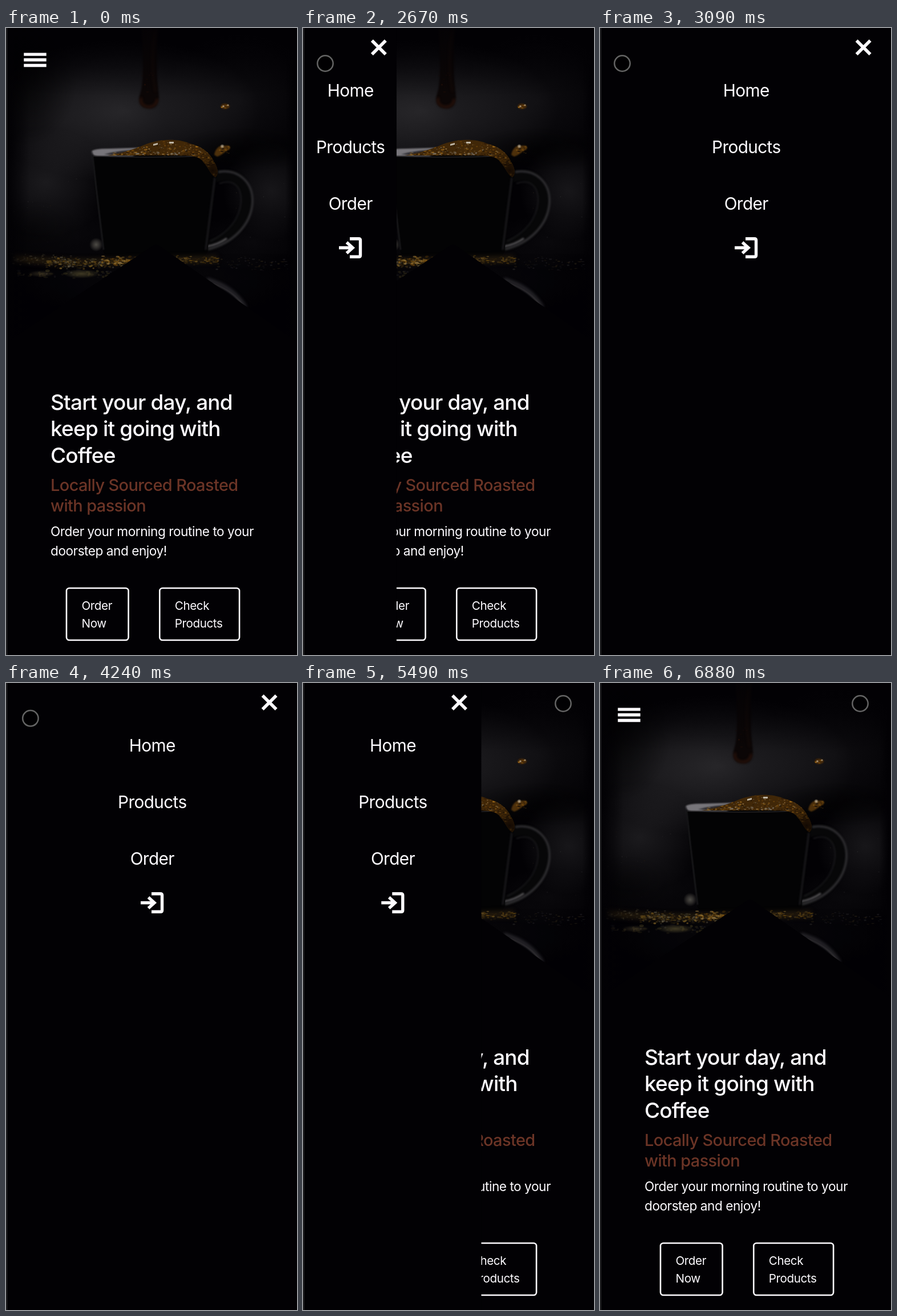
An HTML page with a canvas for the animation above (6910 ms loop, 510x1097 px).

```html
<!DOCTYPE html>
<html lang="en">
<head>
<meta charset="utf-8">
<title>Coffee menu</title>
<style>
  html, body { margin: 0; width: 100%; height: 100%; overflow: hidden; background: #020104; }
  canvas, svg { position: absolute; left: 0; top: 0; width: 510px; height: 1097px; }
  text {
    font-family: Inter, Roboto, sans-serif;
    font-optical-sizing: none;
    letter-spacing: -0.022em;
    fill: #fdfbff;
  }
  .title { font-size: 37px; font-weight: 500; }
  .subtitle { font-size: 29px; font-weight: 500; fill: #6b3426; }
  .body { font-size: 22.7px; }
  .button { font-size: 20.7px; }
  .item { font-size: 29.8px; text-anchor: middle; }
  .outline { fill: none; stroke: #fdfbff; }
</style>
</head>
<body>
<canvas id="photo" width="510" height="1097"></canvas>
<svg viewBox="0 0 510 1097">
  <defs><clipPath id="drawer"><rect id="drawerBox" x="2.5" y="0" width="0" height="1097"/></clipPath></defs>
  <path d="M34 46.1h34M34 55.8h34M34 65.5h34" class="outline" stroke-width="5.4" stroke-linecap="square" stroke-linejoin="round"/>
  <g class="title">
    <text x="78" y="667.5">Start your day, and</text>
    <text x="78" y="714.3">keep it going with</text>
    <text x="78" y="761">Coffee</text>
  </g>
  <g>
    <text class="subtitle" x="78" y="809.5">Locally Sourced Roasted</text>
    <text class="subtitle" x="78" y="846">with passion</text>
  </g>
  <g class="body">
    <text x="78" y="888.5">Order your morning routine to your</text>
    <text x="78" y="923">doorstep and enjoy!</text>
  </g>
  <g class="button">
    <rect class="outline" x="106" y="980" width="108.6" height="91" rx="5" stroke-width="2.6"/>
    <text x="132.5" y="1018">Order</text>
    <text x="132.5" y="1049.3">Now</text>
    <rect class="outline" x="269.3" y="980" width="139.8" height="91" rx="5" stroke-width="2.6"/>
    <text x="295.8" y="1018">Check</text>
    <text x="295.8" y="1049.3">Products</text>
  </g>
  <g clip-path="url(#drawer)">
    <rect width="510" height="1097" fill="#020104"/>
    <text class="item" y="119.8">Home</text>
    <text class="item" y="218.8">Products</text>
    <text class="item" y="317.8">Order</text>
    <path id="login" class="outline" stroke-width="5.4"
      d="M-20.2 0H4M-6.7 -9.5L3.8 0L-6.7 9.5M-1.2 -15.7H14.5Q17.3 -15.7 17.3 -12.9V12.9Q17.3 15.7 14.5 15.7H-1.2"/>
    <path id="cross" class="outline" stroke-width="5.6" d="M-12 -12L12 12M12 -12L-12 12"/>
  </g>
  <rect width="2.5" height="1097" fill="#1d1d1f"/>
  <circle id="pointer" r="13.7" fill="rgba(0,0,0,.4)" stroke="#646464" stroke-width="2.5"/>
</svg>
<script>
const W = 510, H = 1097, LOOP = 6910, LEFT = 2.5, BLACK = '#020104';
const byId = id => document.getElementById(id);

const span = (t, a, b) => Math.min(1, Math.max(0, (t - a) / (b - a)));
const mix = (a, b, p) => a + (b - a) * p;
const outPow = (p, n) => 1 - Math.pow(1 - p, n);
const smooth = p => p * p * (3 - 2 * p);

// cubic-bezier(.25, .1, .25, 1)
function ease(p) {
  let lo = 0, hi = 1;
  for (let i = 0; i < 24; i++) {
    const s = (lo + hi) / 2;
    if (0.75 * s * (1 - s) + s ** 3 < p) lo = s; else hi = s;
  }
  return 0.3 * lo * (1 - lo) ** 2 + 3 * lo * lo * (1 - lo) + lo ** 3;
}

function seeded(seed) {
  return () => {
    seed = (seed * 1664525 + 1013904223) >>> 0;
    return seed / 4294967296;
  };
}

function glow(c, x, y, rx, ry, rgb, alpha) {
  c.save();
  c.translate(x, y);
  c.scale(rx, ry);
  const g = c.createRadialGradient(0, 0, 0, 0, 0, 1);
  g.addColorStop(0, `rgba(${rgb},${alpha})`);
  g.addColorStop(0.5, `rgba(${rgb},${alpha * 0.55})`);
  g.addColorStop(1, `rgba(${rgb},0)`);
  c.fillStyle = g;
  c.fillRect(-1, -1, 2, 2);
  c.restore();
}

function shape(c, d, fill, blur = 0) {
  c.filter = blur ? `blur(${blur}px)` : 'none';
  c.fillStyle = fill;
  c.fill(new Path2D(d));
  c.filter = 'none';
}

function curve(c, d, width, color, blur = 0) {
  c.filter = blur ? `blur(${blur}px)` : 'none';
  c.lineWidth = width;
  c.strokeStyle = color;
  c.stroke(new Path2D(d));
  c.filter = 'none';
}

function speckle(c, seed, count, [x, y, w, h], colors, size, alpha) {
  const rnd = seeded(seed);
  for (let i = 0; i < count; i++) {
    c.globalAlpha = alpha * (0.3 + 0.7 * rnd());
    c.fillStyle = colors[Math.floor(rnd() * colors.length)];
    c.beginPath();
    c.ellipse(x + rnd() * w, y + (rnd() + rnd()) / 2 * h,
      size * (0.5 + rnd()), size * (0.3 + 0.5 * rnd()), 0, 0, 7);
    c.fill();
  }
  c.globalAlpha = 1;
}

function drawBackdrop(c) {
  const gray = '72,71,74';
  glow(c, 205, 145, 240, 125, gray, 0.5);
  glow(c, 110, 165, 150, 100, gray, 0.12);
  glow(c, 410, 125, 140, 115, gray, 0.16);
  glow(c, 70, 270, 115, 95, gray, 0.36);
  glow(c, 465, 285, 85, 85, gray, 0.3);
  glow(c, 90, 360, 150, 55, gray, 0.1);
  glow(c, 430, 375, 100, 50, gray, 0.1);
  glow(c, 260, 440, 250, 70, gray, 0.12);
  glow(c, 25, 90, 100, 120, '0,0,0', 0.6);
  glow(c, 420, 212, 130, 40, '0,0,0', 0.5);
  glow(c, 45, 350, 90, 50, '0,0,0', 0.35);
  shape(c, 'M0 412H510V560H0Z', 'rgba(2,1,4,.25)', 8);
  speckle(c, 5, 26, [5, 225, 120, 160], ['#3a3436', '#332514'], 1.1, 0.6);
  speckle(c, 8, 14, [400, 240, 95, 150], ['#444', '#302820'], 1.1, 0.6);
}

function drawPour(c) {
  shape(c, 'M237 0H267C264 40 263 80 267 110C271 133 263 142 250 141C235 140 230 130 235 115C242 95 241 45 237 0Z',
    '#0b0606', 1.5);
  curve(c, 'M261 5C255 45 256 80 262 112', 3, 'rgba(48,22,12,.3)', 2);
  curve(c, 'M237 122Q234 136 250 138Q263 138 265 124', 3.5, 'rgba(78,32,14,.5)', 2);
  speckle(c, 11, 14, [238, 60, 26, 75], ['#3a1a0d', '#20100b'], 1.8, 0.4);
}

function drawCup(c) {
  curve(c, 'M366 261C396 249 424 266 423 304C421 341 392 372 350 383', 20, '#070708', 1);
  curve(c, 'M372 252C403 246 434 266 432 306C429 346 396 377 354 387', 4, '#2c2b2e', 1.8);
  curve(c, 'M374 272C399 263 413 278 412 304C410 333 390 358 358 373', 2, '#19191b', 1.5);
  curve(c, 'M353 382Q371 379 387 368', 3, '#5b595c', 1.5);
  glow(c, 158, 379, 12, 12, '165,160,145', 0.45);

  shape(c, 'M150 215C180 208 330 207 366 226L370 254L353 391Q350 399 340 399H184Q172 399 170 389L156 285Z', '#030304', 0.5);
  shape(c, 'M150 216Q153 211 180 211L246 209L222 224H160Q151 224 150 216Z', '#77757a', 0.8);
  shape(c, 'M172 221Q202 213 238 213L226 223Z', '#28262a', 1);
  curve(c, 'M151 217L158 280L171 388', 1.6, '#29282b', 0.8);
  curve(c, 'M153 224Q245 228 347 224', 1.2, '#333134', 0.6);
  curve(c, 'M366 262L350 388', 3, '#1a191c', 1.5);
}

function drawCoffee(c) {
  const surface = 'M178 223C210 218 226 211 246 203C270 194 302 193 322 202C344 207 358 219 364 233C371 243 374 256 367 261C359 258 355 244 346 235C340 225 327 223 306 223Z';
  const gold = ['#8a5911', '#5f3a0b', '#a9741f', '#2c1a08', '#160e07'];
  shape(c, surface, '#402708', 0.6);
  c.save();
  c.clip(new Path2D(surface));
  speckle(c, 21, 700, [178, 191, 197, 74], gold, 1.8, 0.85);
  speckle(c, 22, 75, [190, 196, 165, 32], ['#b79a69', '#87806f'], 1.2, 0.75);
  glow(c, 362, 250, 36, 36, '12,5,2', 0.85);
  c.restore();
  speckle(c, 23, 45, [183, 216, 125, 8], ['#85817b', '#5e4420'], 2, 0.7);
  shape(c, 'M258 203l8 -2v3l-8 2ZM286 199h8v3h-8Z', '#bdb5a6', 0.7);

  shape(c, 'M365 222C366 212 375 203 383 206C391 204 396 208 391 213C384 215 380 222 370 225Z', '#4d300b', 0.8);
  shape(c, 'M376 138C377 131 389 131 392 136C393 141 381 145 376 138Z', '#4a2c0a', 1);
  speckle(c, 24, 22, [369, 207, 22, 14], gold, 1.8, 0.85);
  speckle(c, 25, 9, [378, 132, 12, 10], gold, 1.6, 0.8);
  [[379, 207, 4], [381, 137, 2.5], [389, 135, 2]].forEach(([x, y, r]) =>
    glow(c, x, y, r, r, '220,206,180', 0.8));
}

function drawTable(c) {
  const gold = ['#6e5019', '#8f6f2a', '#403010', '#231b0d', '#67614e'];
  curve(c, 'M12 403Q90 411 170 409T370 404', 11, 'rgba(70,51,20,.45)', 4);
  speckle(c, 31, 340, [70, 399, 165, 23], gold, 2.2, 0.65);
  speckle(c, 32, 85, [168, 398, 72, 18], ['#925f13', '#a98645', '#4a3008'], 2.4, 0.65);
  speckle(c, 33, 110, [278, 397, 94, 18], ['#73500f', '#3c2b0e', '#7b602a'], 2.2, 0.6);
  speckle(c, 34, 85, [8, 394, 110, 25], ['#464033', '#54482f', '#28251f'], 2, 0.5);
  speckle(c, 35, 70, [360, 397, 140, 30], ['#2d2618', '#262428'], 2, 0.55);
  speckle(c, 36, 60, [20, 422, 190, 18], ['#3b311b', '#262428', '#504624'], 3, 0.45);
  glow(c, 132, 430, 32, 8, '150,137,78', 0.4);
  glow(c, 62, 430, 24, 6, '112,98,65', 0.35);
  curve(c, 'M352 440Q398 452 420 489', 6, 'rgba(75,73,78,.5)', 2.5);
  curve(c, 'M362 447Q398 460 416 486', 1.5, 'rgba(120,115,117,.4)', 1);
}

function shade(c, x1, y1, stops, w, h) {
  const g = c.createLinearGradient(0, 0, x1, y1);
  stops.forEach(([at, alpha]) => g.addColorStop(at, `rgba(2,1,4,${alpha})`));
  c.fillStyle = g;
  c.fillRect(0, 0, w, h);
}

function drawPhoto(c) {
  c.fillStyle = BLACK;
  c.fillRect(0, 0, W, H);
  drawBackdrop(c);
  drawPour(c);
  drawCup(c);
  drawCoffee(c);
  drawTable(c);
  shade(c, W, 0, [[0, 1], [0.08, 0], [0.96, 0], [0.992, 1]], W, 560);
  shade(c, 0, 120, [[0, 0.75], [1, 0]], W, 120);
  shape(c, 'M0 550L256 382Q263 376 270 382L510 549V1097H0Z', BLACK);
}

function menuWidth(t) {
  const open = ease(span(t, 2566, 3066));
  const close = outPow(span(t, 5415, 5955), 3.25);
  return (W - LEFT) * open * (1 - close);
}

function pointerAt(t) {
  const enter = outPow(span(t, 1850, 2490), 2);
  const p = span(t, 4210, 4910);
  const cross = 0.9 * smooth(p) + 0.1 * p;
  const settle = outPow(span(t, 4910, 5150), 3);
  return [
    mix(-16, 39, enter) + 407.5 * cross + 9.5 * settle,
    62 - 20 * cross - 6 * settle
  ];
}

const items = [...document.querySelectorAll('.item')].map(node =>
  ({ node, width: node.getComputedTextLength() }));

function place(id, x, y) {
  byId(id).setAttribute('transform', `translate(${x} ${y})`);
}

function frame(now) {
  const t = now % LOOP, width = menuWidth(t);
  // Content wider than the drawer stays pinned to its left edge.
  const centre = w => LEFT + Math.max(width, w) / 2;
  byId('drawerBox').setAttribute('width', width);
  items.forEach(item => item.node.setAttribute('x', centre(item.width)));
  place('login', centre(40.5), 384.5);
  place('cross', LEFT + width * 0.95 - 23, 34);
  place('pointer', ...pointerAt(t));
  requestAnimationFrame(frame);
}

drawPhoto(byId('photo').getContext('2d'));
frame(0);
</script>
</body>
</html>
```
